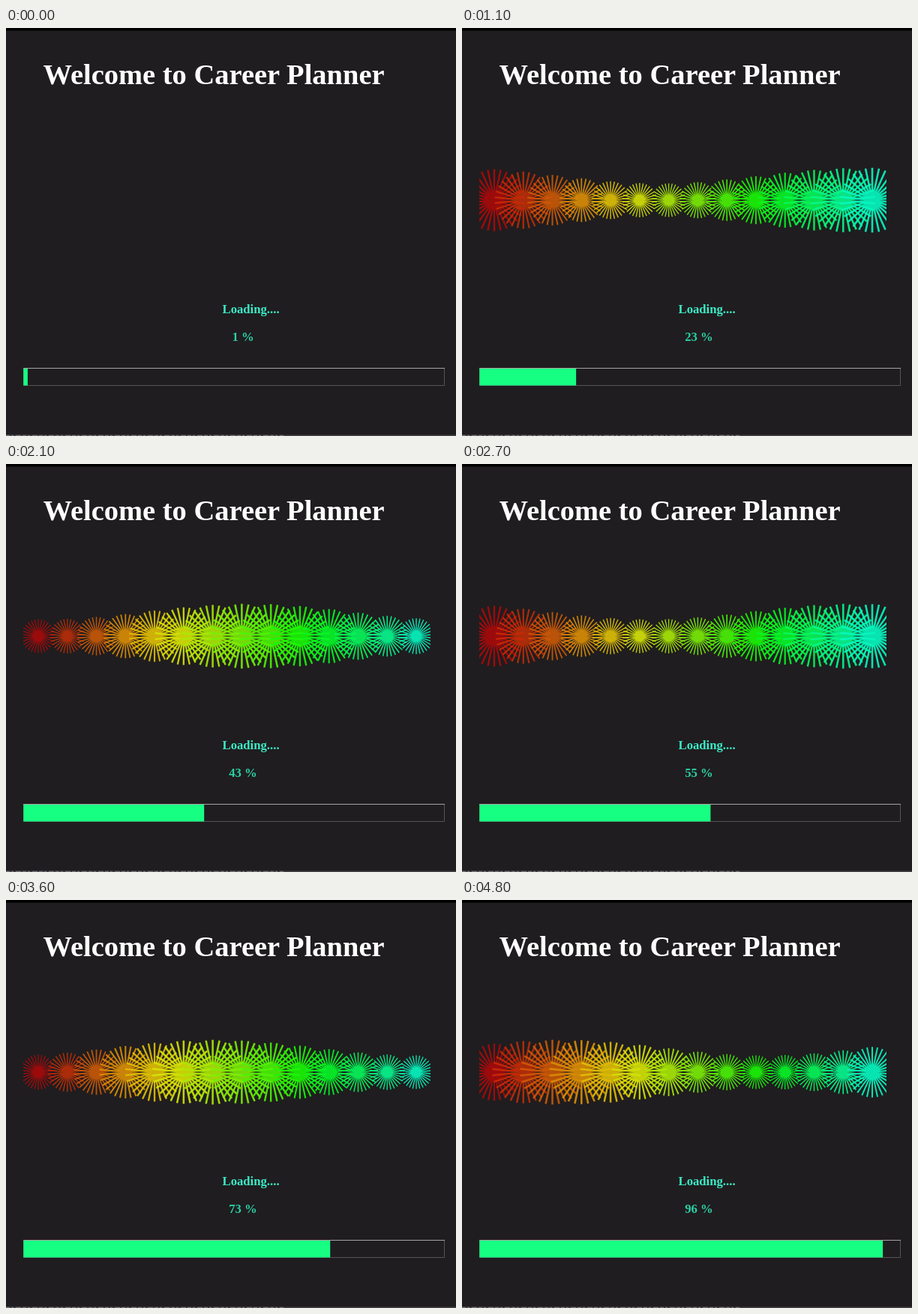
Animation, 600 px wide and 545 px high, one loop 4.9 s. Source, as an HTML page:

```html
<!DOCTYPE html>
<html lang="en">
<head>
<meta charset="utf-8">
<title>Loading</title>
<style>
  html, body { margin: 0; width: 100%; height: 100%; overflow: hidden; background: #1f1d1f; }
  svg { display: block; width: 100%; height: 100%; }
  text { font: bold 16.7px "Liberation Serif", "Times New Roman", serif; }
  #title { font-size: 38.5px; fill: #fff; }
</style>
</head>
<body>
<svg viewBox="0 0 600 545">
  <defs>
    <path id="burst" fill="none" stroke-width=".06"/>
    <clipPath id="strip"><rect x="23" y="186" width="543" height="88"/></clipPath>
  </defs>
  <rect width="600" height="545" fill="#1f1d1f"/>
  <rect width="600" height="3.5" fill="#000"/>
  <path d="M0 544.3H600" stroke="#454346" stroke-width="1.4"/>
  <path d="M0 544.3H370" stroke="#77757a" stroke-width="1.2" stroke-dasharray="5 2 3 3 7 2"/>

  <text id="title" x="49.5" y="75">Welcome to Career Planner</text>
  <g id="wave" clip-path="url(#strip)"></g>
  <text x="288.5" y="381" fill="#3ceac6">Loading....</text>
  <text id="percent" x="316" y="418" text-anchor="middle" fill="#2bd0a6"></text>

  <path d="M23.5 454V477.5H584.5V454" fill="none" stroke="#565456"/>
  <path d="M23 454.5H585" stroke="#a5a3a5"/>
  <rect id="fill" x="23.3" y="455" height="22.5" fill="#17ff82"/>
</svg>
<script>
const LOOP = 4900, STEP = 100, COUNT = 14, SPOKES = 30;
const $ = id => document.getElementById(id);
const wave = $('wave'), percent = $('percent'), fill = $('fill');

// A unit wheel of spokes, the first one vertical
$('burst').setAttribute('d', Array.from({ length: SPOKES }, (_, i) => {
  const a = i / SPOKES * 2 * Math.PI;
  return `M0 0L${Math.sin(a).toFixed(4)} ${(-Math.cos(a)).toFixed(4)}`;
}).join(''));

const wheels = Array.from({ length: COUNT }, (_, i) => {
  const wheel = document.createElementNS('http://www.w3.org/2000/svg', 'use');
  wheel.setAttribute('href', '#burst');
  wheel.setAttribute('stroke', `hsl(${i * 12.8}, 95%, ${41 + Math.min(i, 9)}%)`);
  wheel.setAttribute('stroke-opacity', Math.min(0.9, 0.72 + i * 0.06));
  return wave.appendChild(wheel);
});

function draw(now) {
  const step = Math.floor(now % LOOP / STEP);
  const value = 1 + 2 * step - (step >= 40 ? 1 : 0);
  percent.textContent = value + ' %';
  fill.setAttribute('width', 5.602 * value);

  wave.setAttribute('visibility', step ? 'visible' : 'hidden');
  const crest = 3.27 + 0.855 * step;
  wheels.forEach((wheel, i) => {
    const radius = 32.9 + 10.4 * Math.cos((i - crest) / COUNT * 2 * Math.PI);
    wheel.setAttribute('transform', `translate(${43 + i * 38.77} 230) scale(${radius})`);
  });
}

function tick() {
  draw(performance.now());
  requestAnimationFrame(tick);
}
tick();
</script>
</body>
</html>
```
